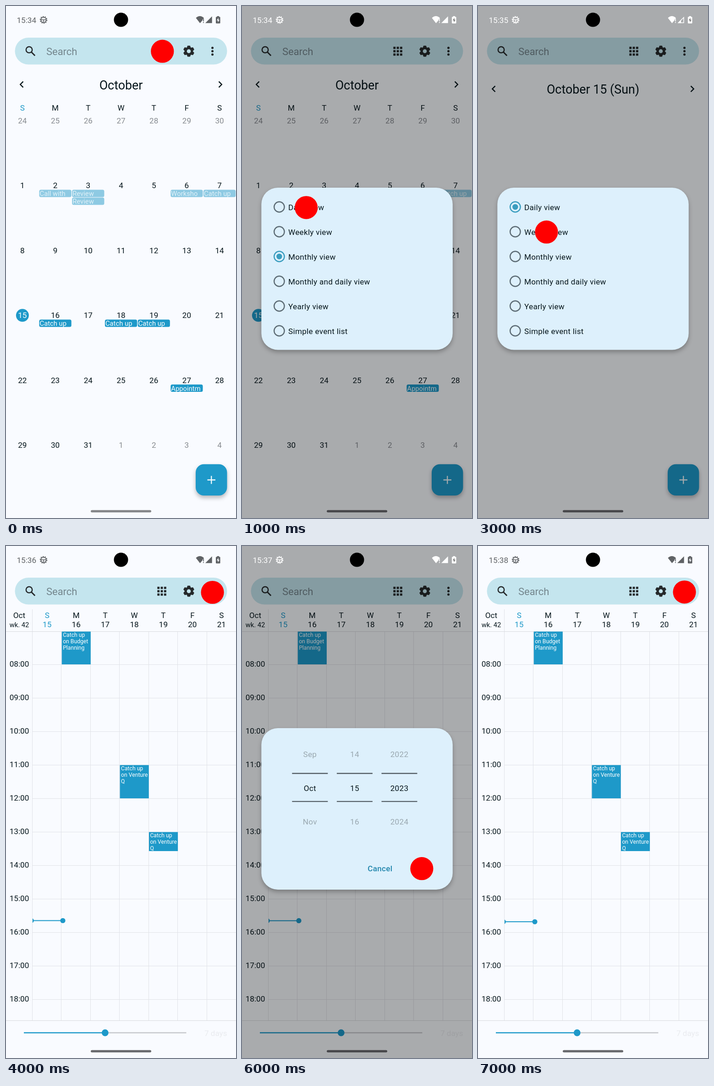
Animation of 502 by 1116 pixels, one loop 8000 ms. Source, as an HTML page:

```html
<!DOCTYPE html>
<html lang="en">
<head>
<meta charset="utf-8">
<title>Calendar views</title>
<style>
  html, body { margin: 0; width: 100%; height: 100%; overflow: hidden; background: #f9fbff; }
  svg { display: block; width: 100%; height: 100%; font-family: Roboto, sans-serif; }
  .modal text { letter-spacing: .018em; }
  .raised { filter: drop-shadow(0 5px 5px rgba(0, 0, 0, .27)); }
</style>
</head>
<body>
<svg id="stage" viewBox="0 0 502 1116"></svg>
<script>
const ACCENT = '#1e99c9', INK = '#06161c', MUTED = '#878b90', ICON = '#25292b', PAPER = '#f9fbff', SHEET = '#ddf0fc';
const BODY = 17.08, SMALL = 14.64, TITLE = 26.84;
const DAYS = [...'SMTWTFS'];

const range = (n, draw) => Array.from({ length: n }, (_, i) => draw(i)).join('');
const rect = (x, y, w, h, fill, rx = 0, more = '') =>
  `<rect x="${x}" y="${y}" width="${w}" height="${h}" rx="${rx}" fill="${fill}" ${more}/>`;
const disc = (x, y, r, fill, more = '') => `<circle cx="${x}" cy="${y}" r="${r}" fill="${fill}" ${more}/>`;
const ring = (x, y, r, color, width, more = '') =>
  disc(x, y, r, 'none', `stroke="${color}" stroke-width="${width}" ${more}`);
const stroke = (d, color, width) => `<path d="${d}" fill="none" stroke="${color}" stroke-width="${width}"/>`;
const shape = (d, fill) => `<path d="${d}" fill="${fill}"/>`;
const group = (content, attrs) => `<g ${attrs}>${content}</g>`;

// y is the middle of the capitals
function label(x, y, text, { size = BODY, fill = INK, anchor = 'middle', weight = 400 } = {}) {
  return `<text x="${x}" y="${y + size * .355}" font-size="${size}" fill="${fill}" text-anchor="${anchor}" font-weight="${weight}">${text}</text>`;
}

function statusBar(clock, color, hollowSignal) {
  const gear = ring(82, 30.3, 7.3, color, 2, 'stroke-dasharray="2.4 2.19"') + ring(82, 30.3, 5.7, color, 1.6)
    + stroke('M76 30h12M82 30v6', color, 1.5);
  const wifi = shape('M414.500 26Q423 18 432 26L429 29.500V31L423.500 37.500Z', color)
    + stroke('M431 27.500v6M431 35v2', color, 1.7);
  const signal = hollowSignal
    ? stroke('M437.500 36.500L449 25V36.500Z', color, 1.5) + shape('M436 37.300L443 30V37.300Z', color)
    : shape('M435 37.300L449.700 22.500V37.300Z', color);
  const battery = rect(458, 23.5, 9.6, 14.5, color, 1.6) + rect(460.8, 22, 4, 2.5, color);
  const bolt = shape('M463.600 25.500L460 31.500H462.500V36L465.800 30H463.600Z', color === '#fff' ? '#777' : PAPER);
  return label(23.5, 30.5, clock, { fill: color, anchor: 'start' }) + gear + wifi + signal + battery + bolt
    + disc(251, 30, 15.5, '#000');
}

function searchBar() {
  const lens = ring(50.5, 95.4, 6.7, ICON, 2.5) + stroke('M55 100L63.200 108.200', ICON, 2.8);
  const apps = range(9, i => rect(330.3 + i % 3 * 7.3, 88.8 + Math.floor(i / 3) * 7.3, 4.9, 4.9, ICON));
  const cog = group(ring(0, 0, 6.7, ICON, 4.8)
    + range(6, i => group(shape('M-4.600 -7L-2.800 -12.100H2.800L4.600 -7Z', ICON), `transform="rotate(${i * 60})"`)),
    'transform="translate(399 98.500)"');
  const dots = range(3, i => disc(450.6, 91.2 + i * 7.3, 2.5, ICON));
  return rect(19.5, 69, 463, 58.6, '#c4e5ee', 29.3)
    + label(88, 99.5, 'Search', { size: 21.96, fill: '#74868d', anchor: 'start' }) + lens + apps + cog + dots;
}

function pager(title, y) {
  return label(251, y + 1, title, { size: TITLE })
    + stroke(`M37.500 ${y - 6.3}l-6.300 6.300 6.300 6.300M464.500 ${y - 6.3}l6.300 6.300 -6.300 6.300`, INK, 2.4);
}

function addButton() {
  return group(rect(414, 998.7, 68.5, 68.3, ACCENT, 18), 'class="raised"')
    + stroke('M439.500 1033h17.500M448.250 1024.250v17.500', '#f2fafd', 2.3);
}

function monthView() {
  const colX = c => 35.86 + c * 71.71, rowY = r => 249.5 + r * 141.5;
  const header = DAYS.map((d, c) => label(colX(c), 222, d, { fill: c ? INK : ACCENT })).join('');
  const dates = range(42, i => {
    const offset = i - 6, inMonth = offset >= 1 && offset <= 31, today = offset === 15;
    const x = colX(i % 7), y = rowY(Math.floor(i / 7));
    const day = offset < 1 ? 30 + offset : offset > 31 ? offset - 31 : offset;
    return (today ? disc(x, y + .3, 14, ACCENT) : '')
      + label(x, y, day, { fill: today ? '#fff' : inMonth ? INK : MUTED });
  });
  const event = (day, text, slot = 0) => {
    const i = day + 6, past = day < 15, x = i % 7 * 71.71 + .8, y = rowY(Math.floor(i / 7)) + 9.4 + slot * 17;
    return rect(x, y, 70.2, 16, past ? '#8ecae3' : ACCENT, 3.5)
      + label(x + 1, y + 8.6, text, { size: 14.8, fill: past ? '#e2f2f9' : '#fff', anchor: 'start' });
  };
  return pager('October', 171) + header + dates
    + event(2, 'Call with') + event(3, 'Review') + event(3, 'Review', 1) + event(6, 'Worksho') + event(7, 'Catch up')
    + [16, 18, 19].map(d => event(d, 'Catch up')).join('') + event(27, 'Appointm') + addButton();
}

const dayView = () => pager('October 15 (Sun)', 180.7) + addButton();

function weekView(nowY) {
  const step = 444 / 7, hourY = h => 258.3 + (h - 8) * 72.95, colX = c => 58 + c * step;
  const header = label(29, 151, 'Oct') + label(29, 172, 'wk. 42', { size: SMALL })
    + DAYS.map((d, c) => {
      const style = { fill: c ? INK : ACCENT };
      return label(colX(c + .5), 151, d, style) + label(colX(c + .5), 171, 15 + c, style);
    }).join('');
  const grid = range(7, c => stroke(`M${Math.round(colX(c)) - .5} ${c ? 186 : 138}V1034`, '#e1e3e8', 1))
    + range(11, i => {
      const y = hourY(8 + i);
      return stroke(`M58 ${Math.round(y) + .5}H502`, '#e1e3e8', 1) + label(29, y - 1, `${String(8 + i).padStart(2, '0')}:00`);
    }) + stroke('M0 186.500H502M0 1034.500H502', '#d8dade', 1);
  const event = (c, top, bottom, lines) => rect(colX(c) + .3, top, step - .3, bottom - top, ACCENT)
    + lines.map((s, i) => label(colX(c) + 2.7, top + 7.3 + i * 14, s, { size: 12.2, fill: '#fff', anchor: 'start' })).join('');
  const venture = ['Catch up', 'on Venture', 'Q'];
  const now = stroke(`M58 ${nowY}H124`, ACCENT, 2) + disc(124, nowY, 5.6, ACCENT)
    + shape(`M58 ${nowY - 4.8}a5.600 5.600 0 0 1 0 9.600Z`, ACCENT);
  const slider = stroke('M216 1061H393.500', '#c6c8cc', 2.4) + stroke('M39 1061H216', ACCENT, 2.4)
    + disc(216.3, 1061, 7.4, ACCENT) + label(482.5, 1062, '7 days', { fill: '#e9ebef', anchor: 'end' });
  return header + grid + event(1, 186.5, 258, ['Catch up', 'on Budget', 'Planning'])
    + event(3, 477.5, 550, venture) + event(4, 623.5, 665, venture) + now + slider;
}

const dialog = (y, h, content) =>
  group(group(rect(42.3, y, 417.5, h, SHEET, 36), 'class="raised"') + content, 'class="modal"');

function viewPicker(selected) {
  const views = ['Daily view', 'Weekly view', 'Monthly view', 'Monthly and daily view', 'Yearly view', 'Simple event list'];
  return dialog(396, 353.6, views.map((name, i) => {
    const y = 438 + i * 54, on = i === selected, color = on ? '#3a9dbf' : '#5d6c75';
    return ring(81.3, y, 11.2, color, 2.4) + (on ? disc(81.3, y, 6.2, color) : '')
      + label(101, y + .7, name, { anchor: 'start' });
  }).join(''));
}

function datePicker() {
  const wheels = [['Sep', 'Oct', 'Nov'], [14, 15, 16], [2022, 2023, 2024]];
  return dialog(397, 352, wheels.map((values, c) => {
    const x = 148.3 + c * 97.6;
    return values.map((v, i) => label(x, 454.3 + i * 73.3, v, { fill: i === 1 ? INK : '#9aa8b0' })).join('')
      + stroke(`M${x - 39} 495.700h78m-78 61.200h78`, '#59636a', 2.4);
  }).join('') + label(301.3, 703.3, 'Cancel', { fill: '#2286ad', weight: 500 }));
}

function overflowMenu() {
  const items = ['Go to date', 'Print', 'Add holidays', 'Add contact birthdays', 'Add contact anniversaries', 'About'];
  return group(rect(218, 76, 252, 20 + items.length * 58.6, SHEET, 5), 'class="raised"')
    + items.map((s, i) => label(238, 115 + i * 58.6, s, { size: 19.5, anchor: 'start' })).join('');
}

// One scene per second
const scenes = [
  { clock: '15:34', view: monthView, tap: [341.3, 98.7], pill: '#858689' },
  { clock: '15:34', view: monthView, modal: () => viewPicker(2), tap: [140.2, 439.3] },
  { clock: '15:35', view: dayView, tap: [342, 99.8], hollowSignal: true },
  { clock: '15:35', view: dayView, modal: () => viewPicker(0), tap: [149.5, 492.7], hollowSignal: true },
  { clock: '15:36', view: () => weekView(816.5), tap: [450.6, 101] },
  { clock: '15:37', view: () => weekView(816.7), popup: overflowMenu, tap: [344, 115] },
  { clock: '15:37', view: () => weekView(816.7), modal: datePicker, tap: [392.4, 703.2] },
  { clock: '15:38', view: () => weekView(819), tap: [450.6, 100.3] },
];

function render({ clock, view, modal, popup, tap, pill = '#68696d', hollowSignal }) {
  return rect(0, 0, 502, 1116, PAPER) + searchBar() + view() + rect(185, 1098.7, 132, 5, pill, 2.5)
    + (popup ? popup() : '')
    + (modal ? rect(0, 0, 502, 1116, '#000', 0, 'opacity=".32"') + modal() : '')
    + statusBar(clock, modal ? '#fff' : '#5f6265', hollowSignal) + disc(...tap, 25.1, '#f00');
}

const stage = document.getElementById('stage');
const start = performance.now();
let shown = -1;

function tick() {
  const index = Math.floor((performance.now() - start) / 1000) % scenes.length;
  if (index !== shown) stage.innerHTML = render(scenes[shown = index]);
  requestAnimationFrame(tick);
}
tick();
</script>
</body>
</html>
```
